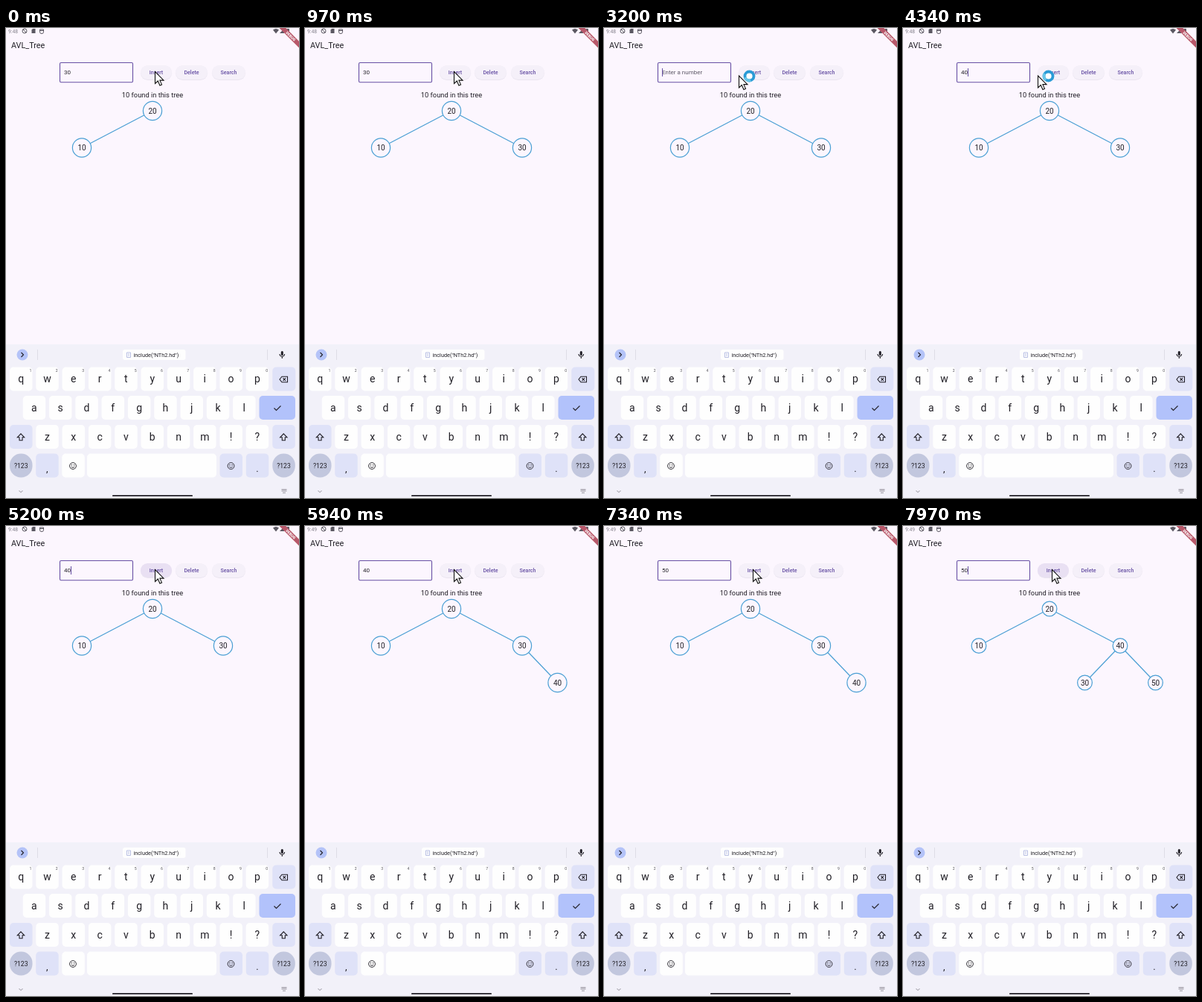
Recreate the animation shown at these times as an HTML page with a canvas. Size 394 by 630 pixels, loop 8 s.

```html
<!DOCTYPE html>
<html lang="en">
<head>
<meta charset="utf-8">
<title>AVL_Tree</title>
<style>
html, body { margin: 0; width: 100%; height: 100%; overflow: hidden; background: #fcf6fe; }
canvas { display: block; width: 394px; height: 630px; }
</style>
</head>
<body>
<canvas id="stage"></canvas>
<script>
const W = 394, H = 630, LOOP = 8000;
const canvas = document.getElementById('stage');
const ratio = window.devicePixelRatio || 1;
canvas.width = W * ratio;
canvas.height = H * ratio;
const ctx = canvas.getContext('2d');
ctx.scale(ratio, ratio);

const PAGE = '#fcf6fe', BOARD = '#f2f1f9', KEY = '#fefefe', MODIFIER = '#dfe2f8';
const INK = '#211f26', GREY = '#85828c', DARK = '#5b5862', BLUE = '#4a9fd4', PURPLE = '#6750a4';

// Timeline: [start time, value]
const EDITS = [[-600, '30'], [2600, '3'], [2800, ''], [3700, '4'], [4100, '40'],
  [6150, '4'], [6300, ''], [6500, '5'], [6750, '50']];
const TREES = [
  [-1000, [[20, 197, 111], [10, 102, 160.5, 0]]],
  [450, [[20, 197, 111], [10, 102, 160.5, 0], [30, 292, 160.5, 0]]],
  [5350, [[20, 197, 111], [10, 102, 160.5, 0], [30, 292, 160.5, 0], [40, 339.5, 210, 2]]],
  [7900, [[20, 197, 111], [10, 102, 160.5, 0], [40, 292, 160.5, 0], [30, 244.5, 210, 2], [50, 339.5, 210, 2]]]
];
const POINTER = [[0, 200.5, 58.5], [1200, 200.5, 58.5], [1750, 153.5, 63], [2850, 153.5, 63],
  [3100, 181.5, 64], [4700, 181.5, 64], [5000, 200.5, 58.5], [LOOP, 200.5, 58.5]];
const CLICKS = [300, 5200, 7780];

const current = (track, t) => track.filter(entry => entry[0] <= t).pop();

function text(s, x, y, size, color = INK, align = 'left', weight = 400) {
  ctx.font = `${weight} ${size}px Roboto, sans-serif`;
  ctx.textAlign = align;
  ctx.fillStyle = color;
  ctx.fillText(s, x, y);
}

function box(x, y, w, h, r, fill) {
  ctx.beginPath();
  ctx.roundRect(x, y, w, h, r);
  ctx.fillStyle = fill;
  ctx.fill();
}

function disc(x, y, r, fill) {
  ctx.beginPath();
  ctx.arc(x, y, r, 0, Math.PI * 2);
  ctx.fillStyle = fill;
  ctx.fill();
}

// Path icon centred on x, y
function icon(path, x, y, { stroke = INK, fill, width = 1.1 } = {}) {
  ctx.save();
  ctx.translate(x, y);
  const shape = new Path2D(path);
  if (fill) { ctx.fillStyle = fill; ctx.fill(shape); }
  if (stroke) { ctx.strokeStyle = stroke; ctx.lineWidth = width; ctx.stroke(shape); }
  ctx.restore();
}

function statusBar(t) {
  text(t < 5440 ? '9:48' : '9:49', 3, 7, 6.8, GREY);
  icon('M3 0A3 3 0 1 1 -3 0A3 3 0 1 1 3 0M-2 -2L2 2', 25, 4, { stroke: DARK, width: 1 });
  icon('M-1 -3H2.5V3H-2.5V-1.5Z', 37, 4, { stroke: null, fill: DARK });
  icon('M-3 -1H3M-2.5 -2.5H2.5V1A2.5 2 0 0 1 -2.5 1Z', 48, 4.5, { stroke: DARK, width: 1 });
  icon('M-4 -2Q0 -5 4 -2L0 3Z', 363, 4.5, { stroke: null, fill: DARK });
  icon('M3 -3V3H-3Z', 371, 4, { stroke: null, fill: DARK });
  box(377, 1, 4, 6.5, 0.8, DARK);

  ctx.save();
  ctx.translate(W, 0);
  ctx.rotate(Math.PI / 4);
  ctx.fillStyle = '#b8586a';
  ctx.fillRect(-22, 12.5, 44, 6.2);
  text('DEBUG', 0, 17.4, 5, '#fff', 'center', 900);
  ctx.restore();
}

function toolbar(t) {
  text('AVL_Tree', 7, 27, 10.8);

  ctx.strokeStyle = PURPLE;
  ctx.lineWidth = 1.1;
  ctx.beginPath();
  ctx.roundRect(72.5, 46.5, 98, 26.3, 1.5);
  ctx.stroke();
  const [editTime, value] = current(EDITS, t);
  if (value) text(value, 78, 62, 8);
  else text('Enter a number', 78, 62, 8, '#5d5866');
  if ((t - editTime) % 1000 < 500) {
    ctx.font = '8px Roboto, sans-serif';
    ctx.fillStyle = PURPLE;
    ctx.fillRect(78 + ctx.measureText(value).width, 54, 1, 11);
  }

  const pressed = CLICKS.some(c => t >= c && t < c + 350);
  [['Insert', 181, 42], ['Delete', 228, 43], ['Search', 277, 45]].forEach(([label, x, w], i) => {
    box(x, 50.5, w, 19.5, 9.7, '#eae5f0');
    box(x, 50, w, 19, 9.5, pressed && i === 0 ? '#e9e0f3' : '#f5f0f9');
    text(label, x + w / 2, 62, 7.1, PURPLE, 'center', 500);
  });
  text('10 found in this tree', 197, 93, 9.3, INK, 'center');
}

function tree(t) {
  const [changed, nodes] = current(TREES, t);
  const radius = 12.6 * Math.min(1, 0.7 + 0.3 * (t - changed) / 250);
  ctx.strokeStyle = BLUE;
  ctx.lineWidth = 1.2;
  for (const [, x, y, parent] of nodes) {
    if (parent === undefined) continue;
    ctx.beginPath();
    ctx.moveTo(nodes[parent][1], nodes[parent][2]);
    ctx.lineTo(x, y);
    ctx.stroke();
  }
  for (const [value, x, y] of nodes) {
    disc(x, y, radius, PAGE);
    ctx.stroke();
    text(value, x, y + 3.8, 10, INK, 'center');
  }
}

const PITCH = 35.3;

function keyRow(letters, x, y, hints) {
  [...letters].forEach((letter, i) => {
    const left = x + i * PITCH;
    box(left, y, 30.5, 32, 5, KEY);
    text(letter, left + 15.2, y + 20.5, 14, INK, 'center');
    if (hints) text((i + 1) % 10, left + 28, y + 6.3, 5.2, '#55535c', 'center');
  });
}

function smiley(x, y) {
  icon('M4.4 0A4.4 4.4 0 1 1 -4.4 0A4.4 4.4 0 1 1 4.4 0M-2.2 1.1Q0 3.8 2.2 1.1', x, y, { width: 0.9 });
  disc(x - 1.6, y - 1.3, 0.7, INK);
  disc(x + 1.6, y - 1.3, 0.7, INK);
}

function keyboard() {
  ctx.fillStyle = BOARD;
  ctx.fillRect(0, 424, W, H - 424);

  disc(22, 438, 7.5, '#b4c3f8');
  icon('M-1.5 -3L1.5 0L-1.5 3', 22, 438);
  ctx.fillStyle = '#dedde6';
  ctx.fillRect(42, 431, 1, 14);
  ctx.fillRect(351, 431, 1, 14);
  box(157, 431, 84.5, 14, 3, KEY);
  icon('M-2.5 -3H2.5V3.5H-2.5ZM-1 -1H1M-1 1H1', 165, 438, { stroke: '#b0b8e0', width: 0.9 });
  text('include("NTh2.hd")', 171.5, 441, 7.3);
  box(369.8, 433, 3, 6, 1.5, INK);
  icon('M-3.3 -1Q-3 2.3 0 2.3Q3 2.3 3.3 -1M0 2V5', 371.3, 438);

  keyRow('qwertyuiop', 5, 454.5, true);
  keyRow('asdfghjkl', 22.7, 493);
  keyRow('zxcvbnm!?', 5 + PITCH, 532);

  box(358.3, 454.5, 31, 32, 5, MODIFIER);
  icon('M-5.5 0L-2.5 -3.8H5V3.8H-2.5ZM-1 -1.8L2.6 1.8M2.6 -1.8L-1 1.8', 373.5, 471);
  box(340.5, 493, 48.5, 32, 5, '#b2c2fb');
  icon('M-4.5 0L-1.5 3L4.5 -3', 365, 509.5);
  for (const x of [5, 358.3]) {
    box(x, 532, 30.5, 32, 5, MODIFIER);
    icon('M0 -4.7L4.7 0.3H2V4.3H-2V0.3H-4.7Z', x + 15, 548.5);
    box(x, 570.5, 30.5, 32, 15.2, '#c2c7de');
    text('?123', x + 15.2, 590, 8.6, INK, 'center');
  }
  for (const [label, x] of [[',', 40.2], ['.', 322.8]]) {
    box(x, 570.5, 30.5, 32, 5, MODIFIER);
    text(label, x + 15.2, 595, 13, INK, 'center');
  }
  box(75.3, 570.5, 30.5, 32, 5, KEY);
  box(109, 570.5, 174, 32, 5, KEY);
  box(287.5, 570.5, 30.5, 32, 5, MODIFIER);
  smiley(90, 587);
  smiley(302.5, 587);

  icon('M-2.5 -1L0 1.5L2.5 -1', 20, 621, { stroke: GREY, width: 0.9 });
  icon('M-3.5 -2.5H3.5M-3.5 -0.5H3.5M-2 2H2', 374, 621, { stroke: GREY, width: 0.9 });
  box(143, 626, 108, 1.8, 0.9, INK);
}

function pointer(t) {
  const next = POINTER.findIndex(p => p[0] > t);
  const [t0, x0, y0] = POINTER[next - 1], [t1, x1, y1] = POINTER[next];
  const k = (t - t0) / (t1 - t0), ease = k * k * (3 - 2 * k);
  const x = x0 + (x1 - x0) * ease, y = y0 + (y1 - y0) * ease;

  if (t >= 1700 && t < 4700) {
    disc(x + 14, y + 0.5, 4.5, '#fff');
    ctx.lineWidth = 3.8;
    ctx.strokeStyle = '#2a9bd6';
    ctx.beginPath();
    ctx.arc(x + 14, y + 0.5, 6, 0, Math.PI * 2);
    ctx.stroke();
    const turn = t / 1000 * Math.PI * 2;
    ctx.strokeStyle = '#69c6e8';
    ctx.beginPath();
    ctx.arc(x + 14, y + 0.5, 6, turn, turn + 1.6);
    ctx.stroke();
  }
  icon('M0 0V16L3.8 12.5L6.4 18.5L9 17.4L6.4 11.6H11.5Z', x, y, { fill: '#fff', stroke: '#111' });
}

function draw(now) {
  const t = now % LOOP;
  ctx.fillStyle = PAGE;
  ctx.fillRect(0, 0, W, H);
  statusBar(t);
  toolbar(t);
  tree(t);
  keyboard();
  pointer(t);
}

let start;
function tick(now) {
  start ??= now;
  draw(now - start);
  requestAnimationFrame(tick);
}
requestAnimationFrame(tick);
</script>
</body>
</html>
```
